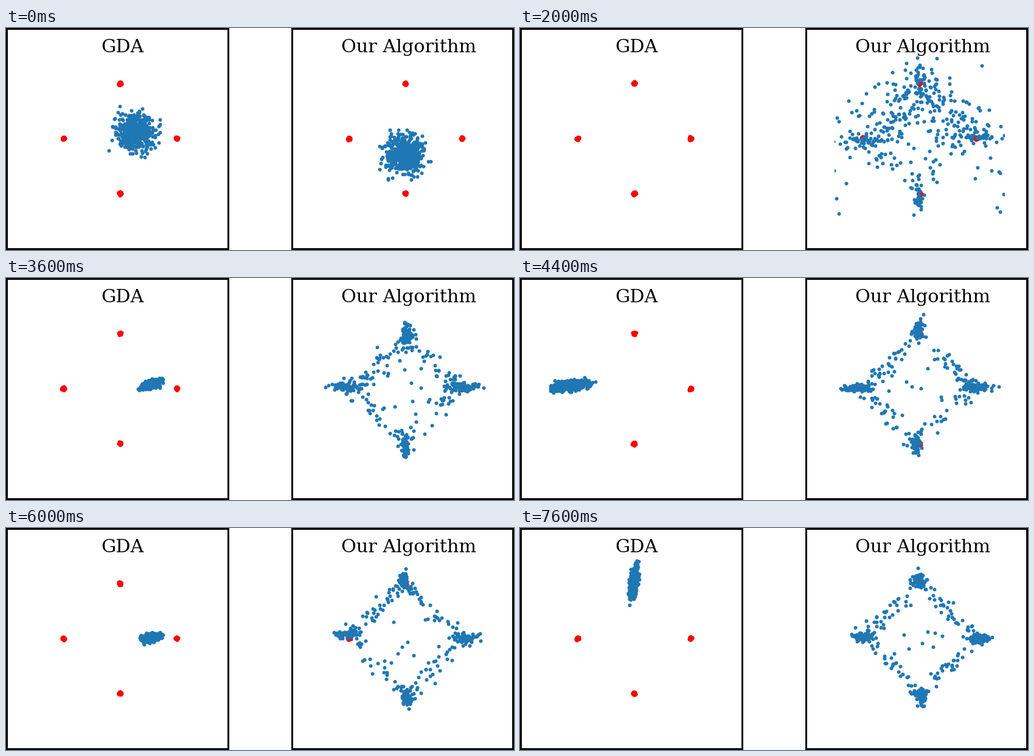
Recreate the animation shown at these times as a matplotlib script. Size 835x366 px, loop 8000 ms.

```python
import matplotlib.pyplot as plt
import numpy as np
from matplotlib.animation import FuncAnimation
from matplotlib.patches import Rectangle

W, H, DPI = 835, 366, 100
PX = 72 / DPI
FRAMES, INTERVAL = 20, 400
BLUE, RED = "#1f77b4", "#ff0000"
LEFT, RIGHT = np.array([187.5, 182]), np.array([656.5, 182])
UNIT = np.array([93, 90.7])
AXES = [np.array(d) for d in [(1, 0), (0, 1), (-1, 0), (0, -1)]]

SPREAD_END = 3   # the right cloud is widest here
STAR_START = 7   # and has become a star here

# The left blob rises out of view, then jumps between modes:
# offset from the panel centre and spread.
MODES = {"L": ((-111, 0), (17, 4.5)),
         "T": ((-1, -91), (3.4, 12)),
         "R": ((50, 0), (7.2, 3.6))}
VISITS = "LRRR" + "TLR" * 4
FIRST_VISIT = 6


def settle(frame):
    return np.exp(-max(frame - STAR_START, 0) / 4)


def gauss(rng, centre, spread, n, corr=0.0):
    u, v = np.clip(rng.normal(size=(2, n)), -2.8, 2.8)
    v = corr * u + np.sqrt(1 - corr**2) * v
    return np.column_stack([u, v]) * spread + centre


def left_points(rng, frame):
    if frame < FIRST_VISIT:
        return gauss(rng, (211, 171 - 104 * frame), (15, 15), 500)
    offset, spread = MODES[VISITS[frame - FIRST_VISIT]]
    centre = LEFT + offset + (0, -11 * settle(frame))
    return gauss(rng, centre, spread, 480, corr=-0.45)


def cloud(rng, frame):
    """A round cloud that rises and opens into an arch."""
    u = frame / SPREAD_END
    n = 500 - int(60 * u)
    t = rng.normal(0, 0.6, n)
    arch = np.column_stack([115 * t, 75 * t**2 - 15 * t]) * u
    centre = (656 - 16 * u, 208 - 80 * u**0.3)
    return arch + gauss(rng, centre, (15 + 10 * u, 15 + 18 * u), n)


def star(rng, frame):
    """Four elongated clusters joined by sides that bend inwards."""
    loose = settle(frame)
    along, across = 9 + 9 * loose, 3.4
    tips = [RIGHT + d * rng.normal(96, 3) * UNIT / UNIT[0]
            + rng.normal(0, 3, 2) * (1 - abs(d)) for d in AXES]
    parts = [gauss(rng, RIGHT, (30, 24), 8)]
    for k, (tip, d) in enumerate(zip(tips, AXES)):
        spread = across + (along * np.array([1, 0.75]) - across) * abs(d)
        parts.append(gauss(rng, tip, spread, 60))
        n = 48 if k >= 2 else 36
        t = rng.beta(0.7, 0.7, (n, 1))
        side = tip + t * (tips[(k + 1) % 4] - tip)
        side += 4 * (0.05 + 0.13 * loose) * t * (1 - t) * (RIGHT - side)
        parts.append(side + rng.normal(0, 6.5 + 2.5 * loose, side.shape))
    return np.vstack(parts)


def right_points(rng, frame):
    if frame <= SPREAD_END:
        return cloud(rng, frame)
    share = (frame - SPREAD_END) / (STAR_START - SPREAD_END)
    late, early = star(rng, frame), cloud(rng, SPREAD_END)
    return np.vstack([late[rng.random(len(late)) < share],
                      early[rng.random(len(early)) > share]])


def target_points(rng, centre):
    return np.vstack([gauss(rng, centre + d * UNIT, (1.1, 1.1), 60)
                      for d in AXES])


fig = plt.figure(figsize=(W / DPI, H / DPI), dpi=DPI, facecolor="white")
ax = fig.add_axes([0, 0, 1, 1])
ax.set(xlim=(0, W), ylim=(H, 0))
ax.axis("off")


def dots(color, centre, zorder):
    line, = ax.plot([], [], "o", color=color, ms=6 * PX, mew=0, zorder=zorder)
    corner = centre - 1.5 * UNIT
    line.set_clip_path(Rectangle(corner, *(3 * UNIT), transform=ax.transData))
    return line


def panel(x, width, title, title_x):
    ax.add_patch(Rectangle((x, 0), width, H, fc="black", lw=0))
    ax.add_patch(Rectangle((x + 3, 3), width - 6, H - 6, fc="white", lw=0))
    ax.text(title_x, 40, title, family="DejaVu Serif", size=30.2 * PX,
            ha="center", va="baseline", color="black", zorder=4)


panel(0, 367, "GDA", 191.5)
panel(469, 366, "Our Algorithm", 662)
views = [(centre, dots(RED, centre, 2), dots(BLUE, centre, 3), make)
         for centre, make in [(LEFT, left_points), (RIGHT, right_points)]]


def draw(frame):
    rng = np.random.default_rng(100 + frame)
    artists = []
    for centre, targets, samples, make in views:
        targets.set_data(*target_points(rng, centre).T)
        samples.set_data(*make(rng, frame).T)
        artists += [targets, samples]
    return artists


anim = FuncAnimation(fig, draw, frames=FRAMES, interval=INTERVAL,
                     repeat=True, repeat_delay=0)
plt.show()
```
